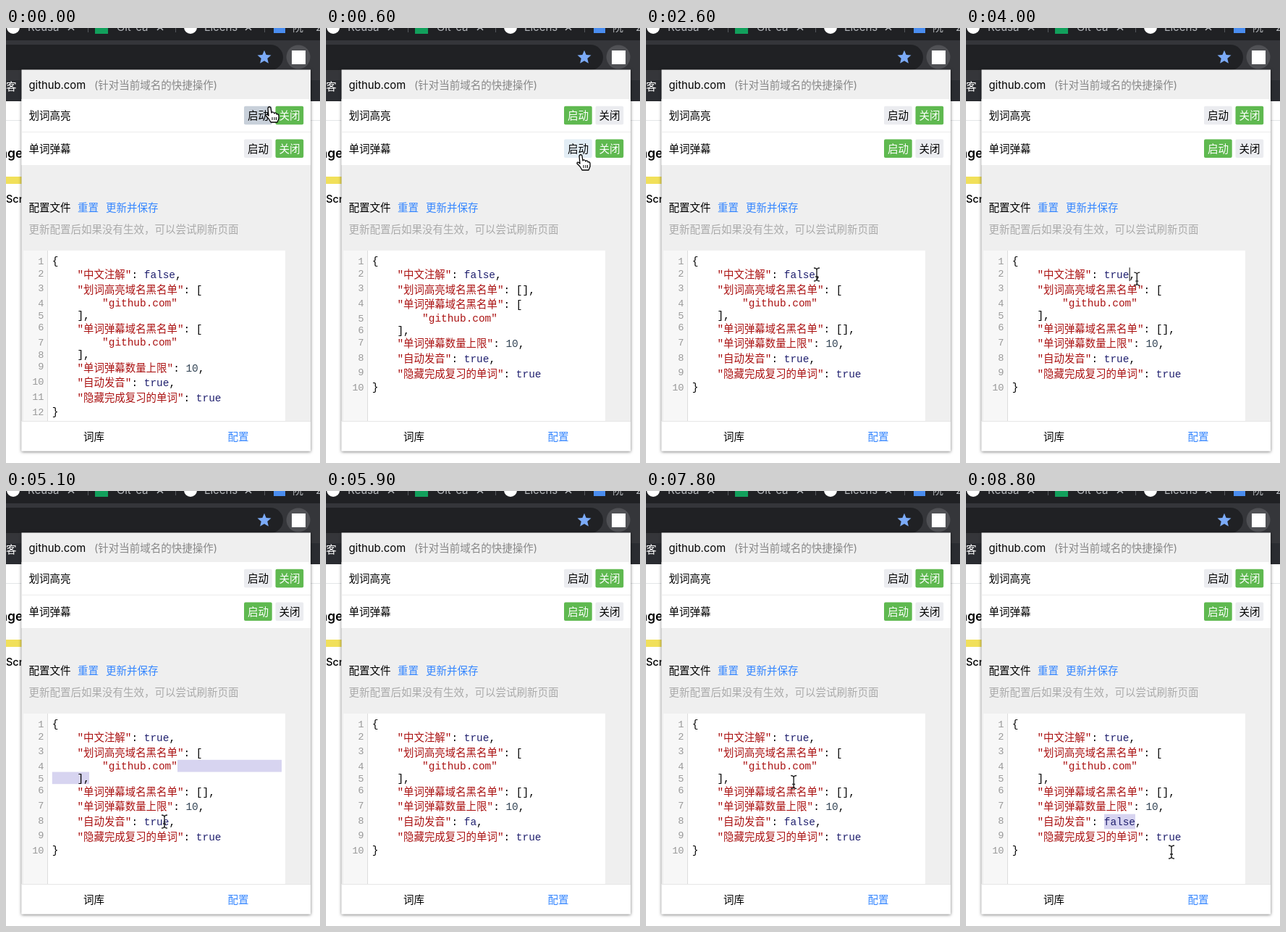
These frames come from a looping animation (434 px wide and 600 px high, 8900 ms). An HTML page:

```html
<!DOCTYPE html>
<html lang="zh-CN">
<head>
<meta charset="utf-8">
<style>
html, body { margin: 0; width: 100%; height: 100%; overflow: hidden; background: #fff; }
svg { display: block; width: 434px; height: 600px; }
text { font: 14.5px Inter, "Noto Sans CJK SC", "Noto Sans CJK", sans-serif; white-space: pre; }
.code text { font-family: "Liberation Mono", "Noto Sans CJK SC", "Noto Sans CJK", monospace; font-size: 14.43px; }
.code .num { font-size: 13.6px; fill: #999; text-anchor: end; }
.mid { text-anchor: middle; }
.tab { font-size: 15px; fill: #b4b7bb; }
.link { fill: #3385ff; }
.str { fill: #a11; }
.atom { fill: #1f1f6e; }
.int { fill: #345; }
.panel { filter: drop-shadow(0 1px 2px #0008); }
</style>
</head>
<body>
<svg viewBox="0 0 434 600">
  <rect width="434" height="600" fill="#fff"/>
  <rect width="434" height="18" fill="#202124"/>
  <rect y="17" width="434" height="55" fill="#35363a"/>
  <rect x="-40" y="23" width="423" height="35" rx="17.5" fill="#202124"/>
  <g id="tabs"></g>
  <path id="star" fill="#7baaf7"/>
  <circle cx="404" cy="40" r="16.5" fill="#505155"/>
  <rect x="395" y="31" width="19" height="19" fill="#fff"/>
  <rect y="72" width="434" height="29" fill="#2a2c31"/>
  <text x="0" y="85.5" fill="#fff">客</text>
  <rect y="127" width="434" height="1" fill="#e4e6e8"/>
  <text x="-8" y="178.5" style="font-size:17.5px;font-weight:600">age</text>
  <rect y="205" width="30" height="10" fill="#f1e05a"/>
  <text x="0" y="241" style="font-weight:500">Scr</text>
  <g id="word">
    <rect y="356" width="78" height="38" fill="#3a3a3a"/>
    <text x="10" y="380" fill="#fff">improve</text>
  </g>
  <g class="panel">
    <rect x="21.5" y="57.5" width="399.5" height="526" fill="#efefef"/>
  </g>
  <rect x="21.5" y="98" width="399.5" height="91" fill="#fff"/>
  <rect x="21.5" y="143" width="399.5" height="1" fill="#ececec"/>
  <rect x="24" y="307" width="33" height="235" fill="#f7f7f7"/>
  <rect x="57" y="307" width="1" height="235" fill="#ddd"/>
  <rect x="58" y="307" width="328" height="235" fill="#fff"/>
  <rect x="21.5" y="542" width="399.5" height="41.5" fill="#fff"/>
  <rect x="21.5" y="542" width="399.5" height="1" fill="#e6e6e6"/>
  <text x="31.5" y="83.5" style="font-size:14.8px">github.com</text>
  <text x="122" y="83.5" fill="#888">(针对当前域名的快捷操作)</text>
  <text x="31.5" y="126">划词高亮</text>
  <text x="31.5" y="172">单词弹幕</text>
  <text x="31.5" y="253">配置文件</text>
  <text x="99" y="253" class="link">重置</text>
  <text x="138" y="253" class="link">更新并保存</text>
  <text x="31.5" y="283.2" fill="#aaa">更新配置后如果没有生效，可以尝试刷新页面</text>
  <text x="121.5" y="568.5" class="mid">词库</text>
  <text x="321" y="568.5" class="mid link">配置</text>
  <g id="buttons"></g>
  <g id="code" class="code"></g>
  <g id="pointer"></g>
</svg>
<script>
const LOOP = 8900, CHAR = 8.66, LEFT = 63.8;
const el = id => document.getElementById(id);
const rect = (x, y, w, h, fill, rx = 0) =>
  `<rect x="${x}" y="${y}" width="${w}" height="${h}" fill="${fill}" rx="${rx}"/>`;
const during = (t, a, b) => t >= a && t < b;

// Time, x, y of the pointer's hot spot
const path = [
  [0, 365, 110], [200, 365, 110], [500, 353, 176], [900, 353, 176],
  [1300, 378, 111], [1700, 378, 111], [2400, 236, 340], [3900, 236, 340],
  [4300, 238, 379], [4700, 118, 396], [5100, 219, 456], [5300, 227, 456],
  [6200, 227, 456], [6700, 188, 220], [7100, 176, 246], [7400, 176, 246],
  [8000, 214, 456], [8300, 214, 456], [8700, 284, 498], [LOOP, 284, 498]
];

const shapes = {
  hand: `<path d="M-3 1C-3-2 1-2 1 1L2 7C3 5 5 6 6 8C7 6 9 7 9 9C10 8 12 9 12 11V15L10 20H1L-2 15L-6 11C-6 8-4 9-2 11Z"
    fill="#fff" stroke="#000" stroke-width="1.3" stroke-linejoin="round"/><path d="M3 13V17M6 13V17M8.5 13V17" stroke="#000"/>`,
  arrow: `<path d="M0 0V17L4 13.5L7 20L10 18.7L7.2 12.5H12.5Z" fill="#000" stroke="#fff" stroke-width="1.2"/>`,
  beam: `<path d="M-4-9Q0-9 0-6Q0-9 4-9M0-6V6M-4 9Q0 9 0 6Q0 9 4 9M-2 3H2" fill="none" stroke="#222" stroke-width="1.4"/>`
};

function place(t) {
  const i = path.findIndex(p => p[0] > t), a = path[i - 1], b = path[i];
  const u = (t - a[0]) / (b[0] - a[0]), k = u * u * (3 - 2 * u);
  return [a[1] + (b[1] - a[1]) * k, a[2] + (b[2] - a[2]) * k];
}

// Erase one word letter by letter, then type another
function retype(t, from, to, erase, type) {
  const n = s => Math.max(0, Math.floor((t - s) / 100) + 1);
  return t < type ? from.slice(0, Math.max(0, from.length - n(erase))) : to.slice(0, n(type));
}

function drawButtons(t, x, y, on) {
  const pressed = t < 200 || during(t, 700, 800) || during(t, 1300, 1400);
  let out = "";
  on.forEach((enabled, row) => ["启动", "关闭"].forEach((label, col) => {
    const bx = 329 + col * 43.5, by = 107.8 + row * 45.7;
    const active = enabled === (col === 0);
    const over = during(x, bx, bx + 39) && during(y, by, by + 25);
    const fill = active ? "#5fb950" : over ? (pressed ? "#c8d0da" : "#e2edf5") : "#ebecf0";
    out += rect(bx, by, 38.7, 25.5, fill, 2) +
      `<text class="mid" x="${bx + 19.5}" y="${by + 18.2}" fill="${active ? "#fff" : "#000"}">${label}</text>`;
  }));
  el("buttons").innerHTML = out;
}

function drawCode(t, on) {
  const note = retype(t, "false", "true", 2800, 3500);
  const sound = retype(t, "true", "false", 5400, 5800);
  const rows = [];
  const add = (indent, html, tall) => rows.push({ indent, html, tall });
  const str = s => `<tspan class="str">"${s}"</tspan>`;
  const pair = (key, value, kind, end = ",") =>
    add(4, `${str(key)}: <tspan class="${kind}">${value}</tspan>${end}`, true);
  const list = (key, empty) => {
    pair(key, empty ? "[]" : "[", "", empty ? "," : "");
    if (!empty) { add(8, str("github.com")); add(4, "],"); }
  };
  add(0, "{");
  pair("中文注解", note, "atom");
  list("划词高亮域名黑名单", on[0]);
  list("单词弹幕域名黑名单", on[1]);
  pair("单词弹幕数量上限", 10, "int");
  pair("自动发音", sound, "atom");
  pair("隐藏完成复习的单词", "true", "atom", "");
  add(0, "}");

  let y = 312.7, lines = "";
  rows.forEach((r, i) => {
    r.y = y;
    r.h = r.tall ? 20.7 : 16.7;
    lines += `<text class="num" x="52.5" y="${y + 13.1}">${i + 1}</text>` +
      `<text x="${LEFT + r.indent * CHAR}" y="${y + (r.tall ? 15.4 : 13.4)}">${r.html}</text>`;
    y += r.h;
  });

  let marks = "";
  const mark = (r, x, end) => marks += rect(x, r.y, end - x, r.h, "#d7d4f0");
  if (during(t, 4500, 5300)) {
    mark(rows[3], 237, 381);
    mark(rows[4], LEFT, t < 4700 ? 90 : 115);
  }
  if (t >= 8200) mark(rows[7], 191, 234);
  const caret = (r, word) => lines += rect(191 + word.length * CHAR, r.y + 1, 1, r.h - 2, "#000");
  if (during(t, 2700, 4300)) caret(rows[1], note);
  if (during(t, 5300, 7200) && t % 1000 < 600) caret(rows[7], sound);
  el("code").innerHTML = marks + lines;
}

function drawPointer(t, x, y) {
  const typing = during(t, 2800, 3900) || during(t, 5400, 6200);
  const button = during(x, 329, 412) && (during(y, 108, 133) || during(y, 153, 179));
  const link = during(x, 99, 211) && during(y, 239, 257);
  const editor = during(x, 58, 386) && during(y, 307, 542);
  const shape = button || link ? "hand" : editor ? "beam" : "arrow";
  el("pointer").innerHTML = typing ? "" : `<g transform="translate(${x} ${y})">${shapes[shape]}</g>`;
}

function drawTabs() {
  const cross = x => `<path d="M${x - 4}-5L${x + 4} 3M${x + 4}-5L${x - 4} 3" stroke="#b4b7bb" stroke-width="1.6"/>`;
  const label = (x, s) => `<text class="tab" x="${x}" y="4">${s}</text>`;
  const dot = x => `<circle cx="${x}" cy="-1" r="9" fill="#fff"/>`;
  el("tabs").innerHTML = dot(10) + label(30, "Reusa") + cross(90) +
    rect(123, -10, 18, 18, "#12a05c") + label(153, "Git-ca") + cross(213) +
    dot(255) + label(274, "Licens") + cross(335) +
    rect(370, -10, 16, 17, "#4a8df0") + label(396, "院") + label(428, "2") +
    [113, 234, 357].map(x => rect(x, 0, 1, 6, "#55585c")).join("");
  el("star").setAttribute("d", "M" + Array.from({ length: 10 }, (_, i) => {
    const r = i % 2 ? 4.5 : 10, a = i * Math.PI / 5;
    return `${357 + r * Math.sin(a)} ${40.7 - r * Math.cos(a)}`;
  }).join("L") + "Z");
}

let last = -1;
function frame(now) {
  const t = Math.floor(now % LOOP / 100) * 100;
  if (t !== last) {
    last = t;
    const [x, y] = place(t);
    const on = [during(t, 200, 1400), t >= 800];
    drawButtons(t, x, y, on);
    drawCode(t, on);
    drawPointer(t, x, y);
    el("word").setAttribute("transform", `translate(${401 - (t - 6700) * 0.33} 0)`);
    el("word").style.display = during(t, 6700, 7500) ? "" : "none";
  }
  requestAnimationFrame(frame);
}
drawTabs();
requestAnimationFrame(frame);
</script>
</body>
</html>
```
